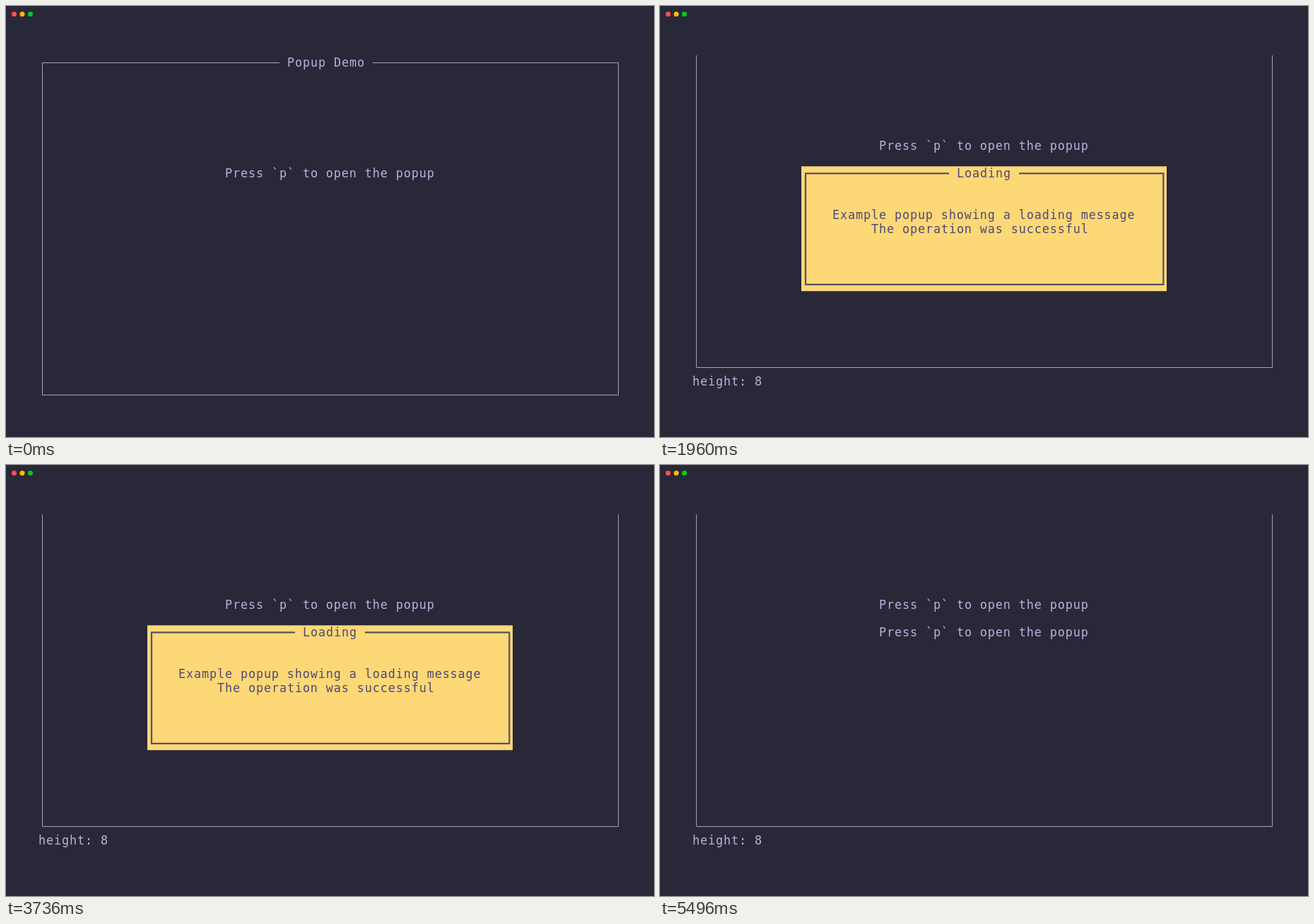
These frames come from a looping animation (917 px wide and 611 px high, 5880 ms). An HTML page:

```html
<!DOCTYPE html>
<html lang="en">
<head>
<meta charset="utf-8">
<title>Popup Demo</title>
<style>
  html, body { margin: 0; width: 100%; height: 100%; overflow: hidden; background: #292839; }
  svg { display: block; width: 917px; height: 611px; }
  text {
    font: 16.8px "DejaVu Sans Mono", monospace;
    letter-spacing: 0.886px;
    fill: #b8b2de;
    white-space: pre;
  }
  path { fill: none; stroke: #a49fc5; stroke-width: 1; }
  #popup text { fill: #514873; }
  #popup path { stroke: #5b4f62; stroke-width: 2.2; }
</style>
</head>
<body>
<svg viewBox="0 0 917 611">
  <rect width="917" height="611" fill="#292839"/>
  <circle cx="11.5" cy="11.5" r="3.5" fill="#ff4f4d"/>
  <circle cx="23" cy="11.5" r="3.5" fill="#febb00"/>
  <circle cx="34.5" cy="11.5" r="3.5" fill="#00cc1d"/>

  <g id="start">
    <path d="M387 80.5H51.5V551.5H866.5V80.5H519"/>
    <text x="398" y="86">Popup Demo</text>
  </g>

  <g id="scrolled">
    <path d="M51.5 70V512.5H866.5V70"/>
    <text x="310" y="204">Press `p` to open the popup</text>
    <text x="46" y="538">height: 8</text>
  </g>

  <text id="prompt" x="310" y="243">Press `p` to open the popup</text>

  <g id="popup">
    <rect x="200" y="227.3" width="517" height="176.9" fill="#fdd877"/>
    <path d="M409 237.4H206V394.8H712.3V237.4H508"/>
    <text x="420" y="243">Loading</text>
    <text x="244" y="302">Example popup showing a loading message</text>
    <text x="299" y="321.5">The operation was successful</text>
  </g>
</svg>
<script>
  const LOOP = 5880, OPEN = 1960, CLOSE = 4920;
  const show = (id, visible) => {
    document.getElementById(id).style.display = visible ? "" : "none";
  };

  function render(time) {
    const t = time % LOOP;
    const popupOpen = t >= OPEN && t < CLOSE;
    show("start", t < OPEN);
    show("scrolled", t >= OPEN);
    show("prompt", !popupOpen);
    show("popup", popupOpen);
  }

  const startTime = performance.now();
  function tick() {
    render(performance.now() - startTime);
    requestAnimationFrame(tick);
  }
  tick();
</script>
</body>
</html>
```
